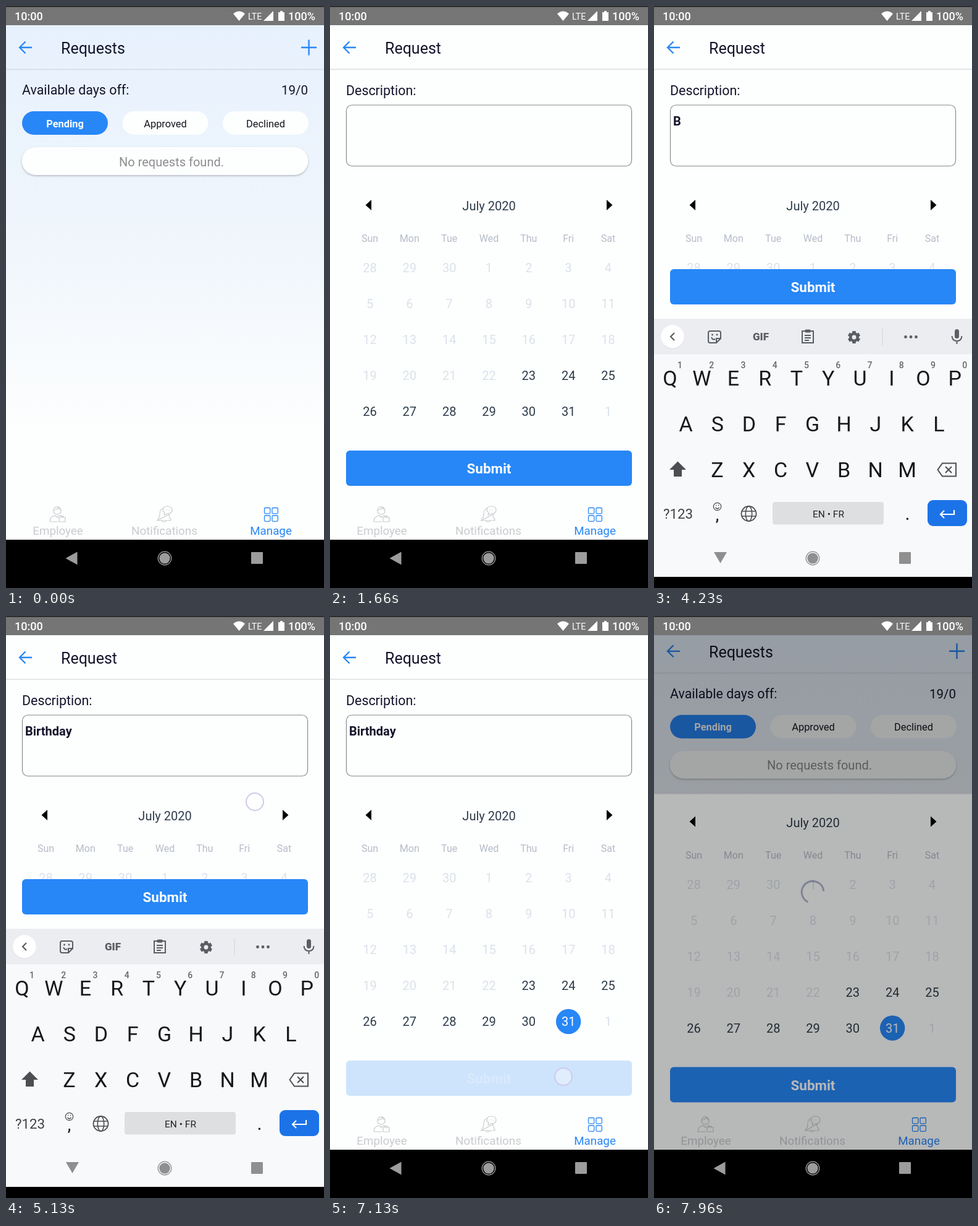
Animation, 515 px wide and 940 px high, one loop 8000 ms. Source, as an HTML page with a canvas:

```html
<!DOCTYPE html>
<html lang="en">
<head>
<meta charset="utf-8">
<title>Day off request</title>
<style>
html, body { margin: 0; width: 100%; height: 100%; overflow: hidden; background: #000; }
canvas { display: block; width: 515px; height: 940px; }
</style>
</head>
<body>
<canvas id="stage"></canvas>
<script>
const W = 515, H = 940, LOOP = 8000;
const TOP = 31, TABS = 798, NAV = 862, PAGE = TABS - TOP;
const BLUE = '#2787f7', INK = '#14142b', PAPER = '#fdfefe';
const canvas = document.getElementById('stage');
const dpr = window.devicePixelRatio || 1;
canvas.width = W * dpr;
canvas.height = H * dpr;
const c = canvas.getContext('2d');

const clamp = v => Math.max(0, Math.min(1, v));
const span = (t, a, b) => clamp((t - a) / (b - a));
const mix = (a, b, k) => a + (b - a) * k;
const easeOut = k => 1 - (1 - k) ** 3;

// Cubic bezier (.35,.45,0,1), solved by bisection.
function revealEase(x) {
  if (x <= 0 || x >= 1) return clamp(x);
  let lo = 0, hi = 1;
  for (let i = 0; i < 24; i++) {
    const s = (lo + hi) / 2;
    if (1.05 * (1 - s) ** 2 * s + s ** 3 < x) lo = s; else hi = s;
  }
  return 1.35 * (1 - lo) ** 2 * lo + 3 * (1 - lo) * lo * lo + lo ** 3;
}

function text(str, x, y, size, color, align = 'left', weight = 400) {
  c.font = `${weight} ${size}px Roboto, sans-serif`;
  c.textAlign = align;
  c.fillStyle = color;
  c.fillText(str, x, y);
}
function rect(x, y, w, h, color) {
  c.fillStyle = color;
  c.fillRect(x, y, w, h);
}
function roundRect(x, y, w, h, r, fill, stroke, width = 1) {
  c.beginPath();
  c.roundRect(x, y, w, h, r);
  paint(fill, stroke, width);
}
function circle(x, y, r, fill, stroke, width = 1) {
  c.beginPath();
  c.arc(x, y, r, 0, 7);
  paint(fill, stroke, width);
}
function paint(fill, stroke, width) {
  if (fill) { c.fillStyle = fill; c.fill(); }
  if (stroke) { c.strokeStyle = stroke; c.lineWidth = width; c.stroke(); }
}
function path(d, fill, stroke, width = 1.5) {
  const p = new Path2D(d);
  if (fill) { c.fillStyle = fill; c.fill(p, 'evenodd'); }
  if (stroke) { c.strokeStyle = stroke; c.lineWidth = width; c.stroke(p); }
}
function group(draw, { y = 0, alpha = 1, clip } = {}) {
  c.save();
  if (clip) { c.beginPath(); c.rect(...clip); c.clip(); }
  c.translate(0, y);
  c.globalAlpha *= alpha;
  draw();
  c.restore();
}

function statusBar() {
  rect(0, 0, W, TOP, '#757575');
  rect(0, 0, W, 1.5, '#1c1c1c');
  text('10:00', 14, 23, 18, '#fff', 'left', 500);
  path('M368 12.5Q377.500 4.500 387 12.500L377.500 24Z', '#fff');
  text('LTE', 392, 22, 14.2, '#fff');
  path('M417 24L433 8V24Z', '#fff');
  path('M441 10H444V8H448V10H451V24H441Z', '#fff');
  text('100%', 501, 23, 18, '#fff', 'right', 500);
}

function navBar(keyboardUp) {
  const color = keyboardUp ? '#8f8f8f' : '#9c9c9c';
  path(keyboardUp ? 'M97 882H118L107.500 900Z' : 'M96.500 892L115.500 881.500V902.500Z', color);
  circle(257, 892, 8.7, color);
  circle(257, 892, 10.8, null, color, 1.3);
  roundRect(397, 882, 19, 19, 1, color);
}

function tabs() {
  const grey = '#c9cbce';
  rect(0, TABS, W, NAV - TABS, PAPER);
  circle(83, 815, 6.2, null, grey, 1.2);
  path('M77 814Q83 814 85 810Q87 814 89 814M71 833Q71 824 80 823L83 826L87 823Q91 823 93 825M71 833H84M86 826H96V833H86ZM89 826V824H93V826', null, grey, 1.2);
  path('M245 829Q249 827 249 820Q249 812 256 811M264 821Q264 827 267 829V831H245ZM252 831Q256 836 260 831', null, grey, 1.2);
  path('M254 814Q254 808 261 808Q269 808 269 814Q269 820 261 820L256 822L257 818Q254 817 254 814M258 814H259M261 814H262M264 814H265', null, grey, 1.2);
  for (const x of [418.5, 431]) for (const y of [810.5, 823])
    roundRect(x, y, 9.3, 9.3, 1.5, null, BLUE, 1.3);
  text('Employee', 84, 854, 18.8, grey, 'center');
  text('Notifications', 256.5, 854, 18.8, grey, 'center');
  text('Manage', 429, 854, 18.8, BLUE, 'center');
}

function header(title, line) {
  path('M42 67H22.500M31.500 57.500L22 67L31.500 76.500', null, BLUE, 2.3);
  text(title, 89, 77, 25, INK);
  rect(0, 101.5, W, 1.3, line);
  rect(0, 103, W, 1, 'rgba(0,0,0,.025)');
}

function requestsPage() {
  const sky = c.createLinearGradient(0, TOP, 0, 680);
  sky.addColorStop(0, '#e7f1fd');
  sky.addColorStop(.55, '#f0f6fc');
  sky.addColorStop(1, PAPER);
  rect(0, 0, W, NAV, sky);
  header('Requests', '#d5dde6');
  path('M478 67H503M490.500 54.500V79.500', null, BLUE, 2.4);
  text('Available days off:', 26, 143, 21.4, INK);
  text('19/0', 489, 143, 20.5, INK, 'right');
  ['Pending', 'Approved', 'Declined'].forEach((label, i) => {
    const x = 26 + i * 162.5;
    roundRect(x, 170, 139, 38, 19, i ? PAPER : BLUE);
    text(label, x + 69.5, 195.5, 16.4, i ? '#16161f' : '#fff', 'center', i ? 400 : 700);
  });
  c.save();
  c.shadowColor = 'rgba(0,0,0,.25)';
  c.shadowBlur = 3;
  c.shadowOffsetY = 1.5;
  roundRect(25.5, 228, 464, 45, 22.5, PAPER);
  c.restore();
  text('No requests found.', 268, 258.5, 20, '#8d8d90', 'center');
}

function calendar(pick, dayAlpha) {
  path('M67 313V330L57.500 321.500ZM448 313V330L457.500 321.500Z', '#000');
  text('July 2020', 257.5, 330, 20, '#2d3c4a', 'center');
  ['Sun', 'Mon', 'Tue', 'Wed', 'Thu', 'Fri', 'Sat'].forEach((name, i) =>
    text(name, 64.5 + i * 64.33, 381.3, 16, '#b6bcc8', 'center'));
  for (let i = 0; i < 35; i++) {
    const x = 64.5 + (i % 7) * 64.33, y = 423 + Math.floor(i / 7) * 58;
    const day = i < 3 ? 28 + i : (i - 3) % 31 + 1;
    const open = i >= 25 && i < 34, chosen = i === 33;
    group(() => {
      if (chosen && pick) circle(x, y + 32 - 32, 20.2, BLUE);
      text(day, x, y + 7, 20, chosen && pick ? '#fff' : open ? '#2d3c4a' : '#dbe2ea', 'center');
    }, { alpha: chosen ? dayAlpha : 1 });
  }
}

function requestPage(s) {
  const lift = s.lifted ? -293 : 0;
  rect(0, 0, W, NAV, PAPER);
  header('Request', '#dcdde0');
  text('Description:', 26, 144, 21.4, INK);
  roundRect(26.5, 160, 462, 98.5, 9, null, '#8a8a8c', 1.2);
  text(s.typed, 31, 193, 20, INK, 'left', 700);
  group(() => calendar(s.pick, s.dayAlpha), { clip: [0, 260, W, 465 + lift] });
  group(() => {
    roundRect(26, 718, 463, 57, 6, BLUE);
    text('Submit', 257.5, 755, 22.4, '#fff', 'center', 700);
  }, { y: lift, alpha: s.buttonAlpha });
}

function toolStrip() {
  const grey = '#5a5d61';
  rect(0, 505, W, 57.5, '#ebedf1');
  circle(30, 535, 19, 'rgba(0,0,0,.06)');
  circle(30, 534, 18.8, '#fff');
  path('M33 528L27 534L33 540', null, grey, 2.2);
  path('M91 525H105Q108 525 108 528V537L101 544H91Q88 544 88 541V528Q88 525 91 525ZM108 537H101V544M93 535Q95 540 99 538', null, grey, 2);
  circle(94.5, 531, 1.4, grey);
  circle(102, 531, 1.4, grey);
  text('GIF', 173, 540, 17, grey, 'center', 900);
  path('M240 525H258V544H240ZM244 532H254M244 536H254M244 540H251', null, grey, 2);
  roundRect(244.5, 522.5, 9, 5, 1.5, grey);
  for (let i = 0; i < 6; i++) {
    const a = i * Math.PI / 3 + Math.PI / 6;
    c.beginPath();
    c.moveTo(324 + Math.cos(a) * 5, 535 + Math.sin(a) * 5);
    c.lineTo(324 + Math.cos(a) * 10, 535 + Math.sin(a) * 10);
    paint(null, grey, 5.5);
  }
  circle(324, 535, 5.7, null, grey, 4.5);
  rect(369.5, 521, 1, 27, '#cfd2d6');
  for (const x of [407.5, 416, 424.5]) circle(x, 534.5, 2.4, grey);
  roundRect(487, 522, 7, 15, 3.5, grey);
  path('M482.500 533Q483 541 490.500 541Q498 541 498.500 533M490.500 541V546', null, grey, 2);
}

function keyboard() {
  const grey = '#4c4e52', step = 51.25;
  rect(0, 505, W, 417, '#f8f9fb');
  toolStrip();
  [['QWERTYUIOP', 26, 613], ['ASDFGHJKL', 51.5, 687], ['ZXCVBNM', 102.5, 761]].forEach(([row, x, y]) =>
    [...row].forEach((key, i) => text(key, x + i * step, y, 34, '#17181a', 'center')));
  for (let i = 0; i < 10; i++)
    text((i + 1) % 10, 42 + i * step, 585, 14, '#66686c', 'center', 500);

  path('M38.500 735.500L52 749H45V760H32V749H25Z', grey);
  path('M467 738.500H489V759.500H467L459.500 749ZM472 744L482 754M482 744L472 754', null, grey, 2);
  text('?123', 39, 828, 22.3, '#3f4145', 'center');
  circle(102.5, 808.5, 6.2, null, grey, 1.3);
  path('M99.500 810Q102.500 814 105.500 810M100 806.500H101.200M104 806.500H105.200', null, grey, 1.3);
  text(',', 102.5, 831, 25, '#222', 'center', 500);
  circle(153.5, 820, 12, null, grey, 1.8);
  c.beginPath();
  c.ellipse(153.5, 820, 5.2, 12, 0, 0, 7);
  paint(null, grey, 1.6);
  path('M142.500 816H164.500M142.500 824H164.500', null, grey, 1.6);
  roundRect(192, 801, 180, 36.5, 4, '#dddfe1');
  text('EN • FR', 282.5, 825.5, 15.5, '#222', 'center');
  text('.', 410.5, 830, 25, '#222', 'center', 500);
  roundRect(443, 798, 64, 42, 9, '#1c73e8');
  path('M486 814V821H464.500M470 815L464 821L470 827', null, '#fff', 2.2);
}

function spinner(t) {
  const k = (span(t, 7230, 7630) * 400 + span(t, 7730, 7960) * 230 - 100) / 530;
  const rad = Math.PI / 180;
  c.beginPath();
  c.arc(257, 446, 17.8, mix(-30, 115, k) * rad, mix(115, 355, k) * rad);
  paint(null, '#323a63', 3);
}

// Touch marks: [x, y, start, end]
const touches = [
  [490, 58.5, 60, 200],
  [273, 213, 3460, 3600],
  [403, 300, 5100, 5230],
  [398, 661, 5860, 6000],
  [378, 744, 6830, 7200]
];
function touchMarks(t) {
  for (const [x, y, from, to] of touches) {
    if (t < from || t >= to) continue;
    const alpha = mix(1, .45, span(t, to - 70, to));
    group(() => circle(x, y, 14, 'rgba(255,255,255,.35)', '#cdcaec', 2), { alpha });
  }
}

function stateAt(t) {
  const press = span(t, 6880, 7040) - span(t, 7200, 7310);
  const dayPress = span(t, 5890, 5970) - span(t, 6000, 6160);
  return {
    open: revealEase(span(t, 1410, 1660)) - revealEase(span(t, 7893, 8318)),
    keys: easeOut(span(t, 3650, 3930)) - span(t, 5230, 5460) ** 1.5,
    lifted: t >= 3720 && t < 5270,
    typed: t < 4230 ? '' : 'Birthday'.slice(0, 1 + Math.floor((t - 4230) / 114)),
    pick: t >= 6000,
    dayAlpha: 1 - .8 * dayPress,
    buttonAlpha: 1 - .78 * press,
    dim: .5 * span(t, 7190, 7320) - .22 * span(t, 7760, 7960)
  };
}

function pages(s) {
  if (s.open < 1) group(() => {
    requestsPage();
    rect(0, 0, W, H, `rgba(0,0,0,${.1 * clamp(s.open / .36)})`);
  }, { y: -.02 * PAGE * s.open });
  if (s.open > 0) {
    const hidden = (1 - s.open) * PAGE;
    group(() => group(() => requestPage(s), { y: .041 * hidden }),
      { clip: [0, TOP + hidden, W, NAV] });
  }
}

function draw(t) {
  const s = stateAt(t);
  c.setTransform(dpr, 0, 0, dpr, 0, 0);
  rect(0, 0, W, H, '#000');
  pages(s);
  if (s.lifted) rect(0, 484, W, NAV - 484, PAPER);
  else tabs();
  if (s.dim > 0) {
    rect(0, 30, W, NAV - 30, `rgba(0,0,0,${s.dim})`);
    group(() => spinner(t), { alpha: (s.dim / .5) ** 1.5 });
  }
  rect(0, NAV, W, H - NAV, '#000');
  if (s.keys > 0) group(() => group(keyboard, { y: (1 - s.keys) * 417 }), { clip: [0, 505, W, 417] });
  navBar(s.keys > .5);
  statusBar();
  touchMarks(t);
}

function frame(now) {
  draw(now % LOOP);
  requestAnimationFrame(frame);
}
requestAnimationFrame(frame);
</script>
</body>
</html>
```
